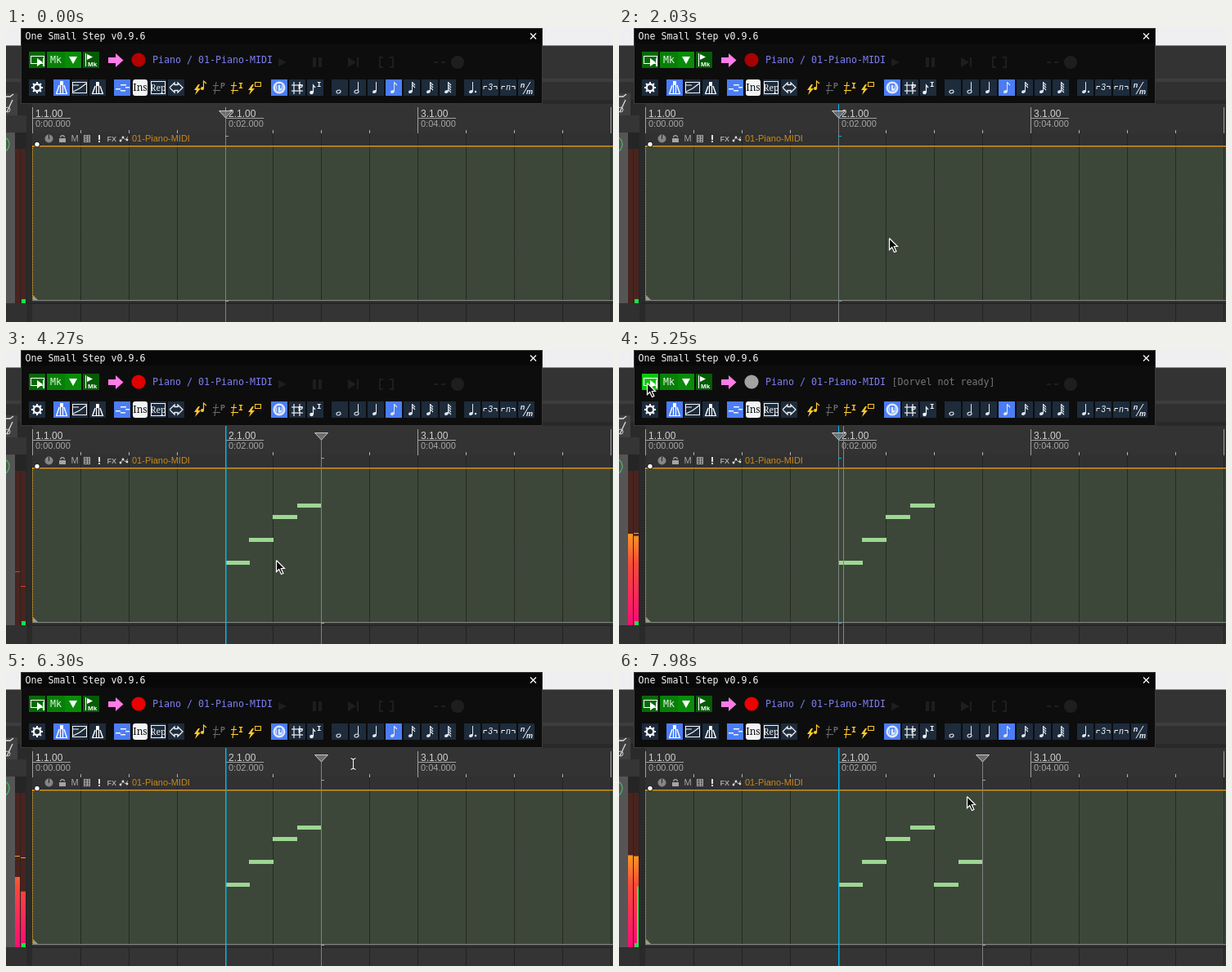
These frames come from a looping animation (742x360 px, 8 s). An HTML page with a canvas:

```html
<!DOCTYPE html>
<html lang="en">
<head>
<meta charset="utf-8">
<title>Step recorder</title>
<style>
html, body { margin: 0; width: 100%; height: 100%; overflow: hidden; background: #333; }
canvas { display: block; width: 742px; height: 360px; }
</style>
</head>
<body>
<canvas id="stage" width="742" height="360"></canvas>
<script>
const c = document.getElementById('stage').getContext('2d');
const LOOP = 8000, STEP = 70, BAR = 235.5, X0 = 32, EDIT_X = 268, CELL = BAR / 8;
const MONO = '11.63px "DejaVu Sans Mono", monospace';
const SANS = '"Liberation Sans", Arial, sans-serif';
const PLAY = { from: 5200, to: 6200 };
const BLUE = '#00b4f0';

const cellX = i => Math.floor(EDIT_X + i * CELL);

// pitch row, key press time, commit time
const notes = [
  [258, 2520, 2730], [230, 2850, 3060], [202, 3150, 3390],
  [188, 3520, 3760], [258, 7400, 7630], [230, 7660, 7860], [202, 7890, 8200]
].map(([y, on, off], i) => ({ y, on, off, x: cellX(i) }));

const sounds = notes.map(n => [n.on + 70, n.off]);
for (let i = 0; i < 4; i++) sounds.push([PLAY.from + i * 250, PLAY.from + (i + 1) * 250]);

// time, x, y
const path = [
  [70, 191, 306], [450, 125, 160], [840, 83, 60], [1150, 140, 19],
  [1650, 330, 257], [4400, 330, 257], [4580, 372, 205], [4900, 120, 21],
  [5100, 34, 40], [5450, 34, 40], [6150, 424, 112], [6700, 424, 112], [7300, 425, 152]
];

function rect(x, y, w, h, color) { c.fillStyle = color; c.fillRect(x, y, w, h); }

function text(s, x, y, color, font, align = 'left') {
  c.font = font; c.fillStyle = color; c.textAlign = align;
  c.fillText(s, x, y);
}

function trace(p) {
  c.beginPath();
  for (let i = 0; i < p.length; i += 2) c.lineTo(p[i], p[i + 1]);
}

function line(color, width, ...p) {
  c.strokeStyle = color; c.lineWidth = width;
  trace(p); c.stroke();
}

function poly(color, ...p) {
  c.fillStyle = color;
  trace(p); c.fill();
}

function disc(x, y, r, color) {
  c.fillStyle = color; c.beginPath(); c.arc(x, y, r, 0, 7); c.fill();
}

function ring(x, y, r, color, width = 1, a = 0, b = 7) {
  c.strokeStyle = color; c.lineWidth = width;
  c.beginPath(); c.arc(x, y, r, a, b); c.stroke();
}

function box(x, y, w, h, color, width = 1) {
  c.strokeStyle = color; c.lineWidth = width; c.strokeRect(x, y, w, h);
}

function pointer(t) {
  if (t < path[0][0]) return null;
  for (let i = 1; i < path.length; i++) {
    const [t0, x0, y0] = path[i - 1], [t1, x1, y1] = path[i];
    if (t < t1) {
      const u = (t - t0) / (t1 - t0), k = u * u * (3 - 2 * u);
      return [x0 + (x1 - x0) * k, y0 + (y1 - y0) * k];
    }
  }
  return path[path.length - 1].slice(1);
}

// Top edge of a meter bar: slow sag while held, quick fall after release
function meterTop(t, side) {
  const [sag, fall] = side ? [0.075, 0.26] : [0.02, 0.22];
  let top = 400;
  for (const [on, off] of sounds) {
    if (t < on) continue;
    const held = Math.min(t, off) - on, free = Math.max(0, t - off);
    top = Math.min(top, 224 + held * sag + free * fall);
  }
  return top;
}

function peakTop(t, side) {
  let top = 400;
  for (let d = 0; d <= 310; d += 10) top = Math.min(top, meterTop(t - d, side));
  return top;
}

function drawMeters(t) {
  rect(11, 148, 13, 189, '#49241f');
  rect(17, 148, 1, 189, '#30201e');
  const g = c.createLinearGradient(0, 148, 0, 337);
  g.addColorStop(0, '#ffd020');
  g.addColorStop(0.4, '#ff9a20');
  g.addColorStop(0.6, '#f84a38');
  g.addColorStop(1, '#ff0a76');
  for (let side = 0; side < 2; side++) {
    const x = side ? 18 : 11, top = meterTop(t, side), peak = peakTop(t, side);
    if (top < 337) rect(x, top, 6, 337 - top, g);
    if (peak < 291 && peak < top - 2) rect(x, Math.round(peak), 6, 1, peak > 255 ? '#e8392c' : '#ffa030');
  }
  rect(19, 332, 5, 5, '#14e34a');
  for (const n of notes) {
    const y = 236 + (t - n.on) * 0.295;
    if (t >= n.on && y < 332) rect(22, y, 2, 337 - y, '#22f04c');
  }
}

function drawBackdrop() {
  rect(0, 0, 742, 360, '#333');
  rect(0, 0, 742, 21, '#efeff1');
  rect(0, 21, 742, 1, '#8a8a8a');
  rect(0, 62, 742, 4, '#3d3d3d');
  rect(0, 66, 742, 22, '#303030');
  rect(0, 88, 742, 5, '#292929');
  rect(0, 80, 14, 27, '#404040');
  line('#ddd', 1.3, 1, 103, 8, 88);
  line('#ddd', 1.3, 0, 84, 5, 84, 9, 81);
  ring(2, 100, 3, '#ccc');
  rect(14, 93, 18, 267, '#2a2a2a');
  rect(0, 107, 25, 21, '#353535');
  rect(0, 128, 11, 209, '#555');
  rect(11, 128, 14, 209, '#252525');
  rect(0, 337, 25, 23, '#303030');
  ring(-6, 142.5, 10, '#45bd62', 1.2, -1, 1);
}

function drawHeaderIcons() {
  const g = '#a5a5a5';
  disc(52.5, 135.5, 5, '#858585'); line('#222', 1, 52.5, 131, 52.5, 136);
  rect(65, 135, 8, 5, g); ring(69, 134, 2.4, g, 1.2, Math.PI, 0);
  text('M', 79.5, 139, g, '11px ' + SANS);
  box(95.5, 131.5, 7, 8, g);
  line(g, 1, 99.5, 132, 99.5, 139);
  for (let y = 133; y < 139; y += 2) rect(96, y, 7, 1, g);
  rect(113, 131, 2, 6, '#ddd'); rect(113, 138, 2, 2, '#ddd');
  text('FX', 123.5, 139, g, 'bold 9px ' + SANS);
  line(g, 1, 140, 138, 143, 134, 146, 137, 149, 133);
  for (const [x, y] of [[140, 138], [143, 134], [148, 137]]) disc(x, y, 1.4, '#ddd');
  text('01-Piano-MIDI', 154, 139, '#c8881c', '11px ' + SANS);
}

function drawArrange() {
  rect(32, 93, 710, 35, '#333');
  rect(32, 128, 710, 16, '#313131');
  rect(32, 144, 710, 190, '#3c4739');
  rect(32, 334, 710, 26, '#343434');
  rect(25, 336, 717, 2, '#262626');
  for (let i = 1; i <= 12; i++) {
    const x = Math.floor(X0 + .5 + i * BAR / 4);
    rect(x, 128, 1, 16, '#242424');
    for (let y = 146; y < 333; y += 2) rect(x, y, 1, 1, '#0c0e0b');
    rect(x, 338, 1, 22, '#222');
    if (i % 4) rect(x, 125, 1, 4, '#b0b0b0');
  }
  for (let b = 0; b < 4; b++) {
    const x = Math.round(X0 + b * BAR);
    rect(x, 97, 1, 32, '#a0a0a0');
    if (b > 2) break;
    text(`${b + 1}.1.00`, x + 4, 108.5, '#d0d0d0', '12px ' + SANS);
    rect(x, 110, 47, 1, '#a0a0a0');
    text(`0:0${b * 2}.000`, x + 4, 121, '#a6a6a6', '11px ' + SANS);
  }
  rect(32, 144, 710, 1.4, '#e0940f');
  for (let y = 145; y < 333; y += 2) rect(32, y, 1, 1, '#ffae20');
  rect(32, 333, 710, 1, '#888c84');
  poly('#9a9c80', 33, 327, 39, 333, 33, 333);
  drawHeaderIcons();
  disc(38, 142.5, 3.6, '#111'); disc(38, 142.5, 2.7, '#fff');
}

function drawTimeline(t) {
  const playing = t >= PLAY.from && t < PLAY.to;
  let count = 0;
  for (const n of notes) {
    if (t < n.off) continue;
    count++;
    rect(n.x, n.y, 30, 5, '#9fd694');
  }
  const mark = playing ? EDIT_X : cellX(count);
  const focused = t >= 1400, atEdit = mark === EDIT_X;
  if (focused) rect(EDIT_X, 93, atEdit ? 1 : 1.5, 267, BLUE);
  rect(mark, 110, 1, 250, '#808080');
  const tick = atEdit && focused ? BLUE : '#a0a0a0';
  rect(mark, 132, 4, 1, tick);
  rect(mark, 334, 4, 1, tick);
  poly('rgba(130,130,130,.75)', mark - 7.5, 101.5, mark + 8.5, 101.5, mark + .5, 110);
  line('#c8c8c8', 1, mark - 7.5, 101.5, mark + 8.5, 101.5, mark + .5, 110, mark - 7.5, 101.5);
  if (playing) rect(Math.round(EDIT_X + (t - PLAY.from) * BAR / 2000), 93, 1, 267, '#858585');
}

function drawGhostTransport(playing) {
  const g = '#1e1e1e';
  if (!playing) {
    poly(g, 333, 37, 343, 42, 333, 47);
    rect(375, 36, 4, 12, g); rect(382, 36, 4, 12, g);
    poly(g, 418, 36, 428, 42, 418, 48); rect(429, 36, 2, 12, g);
    box(457, 36, 16, 12, g, 2); rect(461, 34, 8, 16, '#0d0d0d');
  }
  rect(523, 41, 5, 2, g); rect(532, 41, 5, 2, g);
  disc(552, 42, 8, g);
}

function note(x, kind, dotted) {
  const y = 78, w = '#dfe6ee';
  c.save();
  c.translate(x + 8.5, y); c.rotate(-.35);
  c.beginPath(); c.ellipse(0, 0, 2.6, 1.8, 0, 0, 7);
  if (kind < 2) { c.strokeStyle = w; c.lineWidth = 1.1; c.stroke(); }
  else { c.fillStyle = w; c.fill(); }
  c.restore();
  if (kind) line(w, 1, x + 10.5, y - 1, x + 10.5, 66);
  for (let i = 0; i < kind - 2; i++) line(w, 1.1, x + 10.5, 66.5 + i * 3, x + 14, 70 + i * 3);
  if (dotted) disc(x + 14, y, 1.2, w);
}

function drawPedal(x, down) {
  const w = '#fff', y = down ? 65 : 66;
  rect(x + 8, y, 4, 5, w);
  line(w, 1.4, x + 7, y + 5, x + 3.5, 81);
  line(w, 1.4, x + 13, y + 5, x + 16.5, 81);
  for (const i of [8, 11]) line(w, 1.2, x + i + .5, y + 5, x + i + .5, 81);
  line(w, 1, x + 3, 80.5, x + 17, 80.5);
}

function bolt(x, color) {
  poly(color, x + 7, 69, x + 2, 76, x + 5, 76, x + 3, 82, x + 10, 74, x + 6.5, 74, x + 9, 69);
}

// Small sharp-like mark with a letter at its upper right
function insertMark(x, letter, color) {
  line(color, 1.1, x + 3, 70.5, x + 10, 70.5);
  line(color, 1.1, x + 3, 76.5, x + 12, 76.5);
  line(color, 1.1, x + 7, 66, x + 5, 81);
  text(letter, x + 12, 74, color, 'bold 10px "Liberation Mono", monospace');
}

function tuplet(x, label, color) {
  line(color, 1, x + 2, 75, x + 2, 71.5, x + 6, 71.5);
  line(color, 1, x + 14, 71.5, x + 18, 71.5, x + 18, 75);
  text(label, x + 10, 75.5, color, 'italic 10px ' + SANS, 'center');
}

function drawTools() {
  const off = '#1d2b3b', on = '#4b7df5', w = '#f2f4f7';
  const active = [58, 132, 324, 464];
  const xs = [28, 58, 80, 102, 132, 198, 324, 346, 368, 398, 420, 442, 464, 486, 508, 530, 560, 582, 604, 626];
  for (const x of xs) rect(x, 63, 20, 20, active.includes(x) ? on : off);

  ring(38, 73, 4.2, w, 2.4);
  for (let i = 0; i < 8; i++) {
    const a = i * Math.PI / 4, k = Math.cos(a), s = Math.sin(a);
    line(w, 2, 38 + k * 5, 73 + s * 5, 38 + k * 7, 73 + s * 7);
  }
  drawPedal(58, true);
  box(81.5, 66.5, 17, 13, w);
  line(w, 1.2, 82, 78, 90, 74, 98, 68); line(w, 1, 82, 70, 89, 70);
  drawPedal(102, false);

  rect(140, 69, 7, 1.5, w); rect(134, 74, 6, 1.5, w); rect(146, 72, 5, 1.5, w); rect(140, 76, 6, 1.5, w);
  c.fillStyle = w; c.beginPath(); c.roundRect(155, 63, 18, 20, 3); c.fill();
  text('Ins', 164, 77, '#111', '12px "Noto Serif", serif', 'center');
  rect(176, 63, 20, 20, off);
  box(177.5, 65.5, 17, 15, w);
  text('Rep', 186, 77, w, '10.5px "Noto Serif", serif', 'center');
  line(w, 1.3, 200, 73, 206, 67, 206, 69.5, 210, 69.5, 210, 67, 216, 73,
    210, 79, 210, 76.5, 206, 76.5, 206, 79, 200, 73);

  const y = '#ffc82e';
  bolt(228, y); disc(240, 74, 2, y); line(y, 1.2, 241.5, 74, 241.5, 65, 245, 68);
  insertMark(250, 'P', '#686868');
  insertMark(272, 'I', y);
  bolt(294, y); box(304.5, 66.5, 7, 5, y);

  disc(334, 73, 7.5, '#dce8ff'); ring(334, 73, 4.5, '#7da2ff', 1.2);
  line(on, 1.5, 332, 77, 332, 69, 336, 69, 336, 74);
  for (const d of [0, 7]) {
    line(w, 1.2, 349, 70 + d, 363, 70 + d);
    line(w, 1.2, 352 + d, 66, 352 + d, 81);
  }
  text('P', 357, 75, w, 'bold 9px ' + SANS);
  disc(373.5, 79, 2.3, w); line(w, 1.2, 375.5, 79, 375.5, 70, 378, 73);
  text('I', 380, 72, w, 'bold 9px "Liberation Mono", monospace');

  for (let i = 0; i < 7; i++) note(398 + i * 22, i);
  note(560, 2, true);
  tuplet(582, '3', w);
  tuplet(604, 'n', w);
  text('n', 631.5, 73, w, 'italic bold 9px ' + SANS, 'center');
  text('m', 640, 81, w, 'italic bold 9px ' + SANS, 'center');
  line(w, 1, 632, 81, 641, 66);
}

function drawPanel(t, hover) {
  const playing = t >= PLAY.from && t < PLAY.to, w = '#fff', green = '#087f08';
  rect(18, 0, 638, 93, '#3a3a3a');
  rect(19, 1, 636, 91, '#0d0d0d');
  rect(19, 1, 636, 18, '#080808');
  text('One Small Step v0.9.6', 23.5, 14, '#f4f4f4', MONO);
  line(w, 1.2, 641, 6.5, 648, 13.5); line(w, 1.2, 648, 6.5, 641, 13.5);
  drawGhostTransport(playing);

  rect(28, 29, 20, 20, hover ? '#0ac80a' : '#066a06');
  box(30.5, 34.5, 16, 9, w);
  poly(w, 38, 37, 45, 42, 38, 47); rect(45, 37, 2, 10, w);
  rect(50, 29, 22, 20, green);
  text('Mk', 54, 43, '#e4f4e4', MONO);
  rect(72, 29, 20, 20, '#088c08');
  poly(w, 77, 35, 87, 35, 82, 44);
  rect(94, 29, 20, 20, '#055c05');
  rect(97, 31, 1, 16, w); poly(w, 99, 32, 106, 35.5, 99, 39);
  text('Mk', 100, 47, w, 'bold 8px ' + SANS);

  poly('#ff7be6', 125, 36, 134, 36, 134, 31, 143.5, 39.5, 134, 48, 134, 43, 125, 43);
  const red = Math.round(202 - 35 * Math.cos(2 * Math.PI * (t / 1700 - 0.15)));
  disc(162, 39, 8.6, playing ? '#a2a2a2' : `rgb(${red},0,0)`);
  text('Piano / 01-Piano-MIDI', 179, 43, '#7d7df0', MONO);
  if (playing) text('[Dorvel not ready]', 333.5, 43, '#777', MONO);
  drawTools();
}

function drawPointer(p) {
  const [x, y] = p;
  c.save();
  c.translate(Math.round(x) + .5, Math.round(y) + .5);
  if (y > 93 && y < 128) {
    for (const [color, width] of [['#222', 3], ['#f2f2f2', 1.2]]) {
      line(color, width, -3, -7, 0, -5.5, 3, -7);
      line(color, width, 0, -6, 0, 6);
      line(color, width, -3, 7, 0, 5.5, 3, 7);
    }
  } else {
    const arrow = [0, 0, 0, 14, 3.2, 11, 6, 17, 8.4, 16, 5.8, 10, 10, 10];
    poly('#0a0a0a', ...arrow);
    line('#fff', 1.2, ...arrow, 0, 0);
  }
  c.restore();
}

function draw(now) {
  const t = Math.floor(now % LOOP / STEP) * STEP;
  const p = pointer(t);
  const hover = p && p[0] > 28 && p[0] < 48 && p[1] > 29 && p[1] < 49;
  drawBackdrop();
  drawMeters(t);
  drawArrange();
  drawTimeline(t);
  drawPanel(t, hover);
  if (p) drawPointer(p);
}

const start = performance.now();
function tick() {
  draw(performance.now() - start);
  requestAnimationFrame(tick);
}
tick();
</script>
</body>
</html>
```
